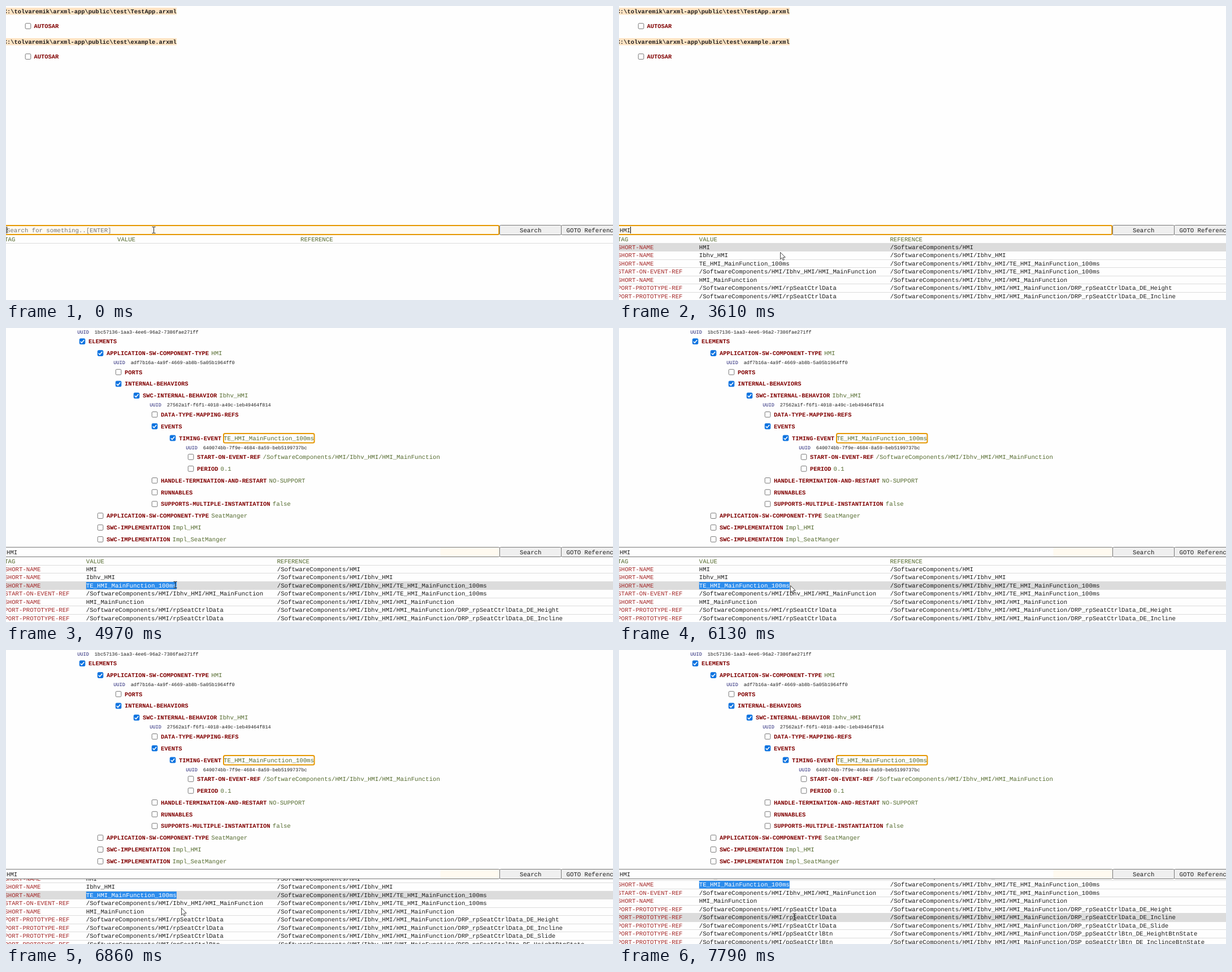
Write an HTML page that moves like this. It is 1074 px wide and 521 px high and loops after 8 s.

```html
<!DOCTYPE html>
<html lang="en">
<head>
<meta charset="utf-8">
<title>ARXML search</title>
<style>
  html, body { margin: 0; width: 100%; height: 100%; overflow: hidden; background: #fefefe; }
  svg { display: block; width: 100%; height: 100%; }
  text { font: 10.667px "Liberation Mono", "Courier New", monospace; fill: #1c1c1c; white-space: pre; text-rendering: geometricPrecision; }
  .bold { font-size: 10.42px; font-weight: 700; }
  .tag { fill: #800000; }
  .val, .head { fill: #556b2f; }
  .ref { fill: #a52a2a; }
  .small { font-size: 8.533px; }
  .uuid { fill: #191970; }
  .hint { fill: #757575; }
  .crisp { shape-rendering: crispEdges; }
</style>
</head>
<body>
<svg viewBox="0 0 1074 521" id="stage">
  <clipPath id="below"><rect y="406" width="1074" height="115"/></clipPath>
</svg>
<script>
const LOOP = 8000;
const stage = document.getElementById('stage');

function el(parent, name, attrs) {
  const node = document.createElementNS(stage.namespaceURI, name);
  for (const key in attrs) node.setAttribute(key, attrs[key]);
  return parent.appendChild(node);
}
const group = (parent = stage, attrs = {}) => el(parent, 'g', attrs);
const rect = (parent, x, y, width, height, attrs) => el(parent, 'rect', { x, y, width, height, ...attrs });
function text(parent, x, mid, str, cls = '') {
  const drop = cls.includes('small') ? 2.8 : 3.5;
  const node = el(parent, 'text', { x, y: mid + drop, class: cls });
  node.textContent = str;
  return node;
}
const show = (node, on) => node.setAttribute('display', on ? 'inline' : 'none');

// Last value whose start time has passed
function at(steps, t) {
  let value = steps[0][1];
  for (const [start, v] of steps) if (t >= start) value = v;
  return value;
}

function checkbox(parent, x, y, on) {
  rect(parent, x - 4.8, y - 4.8, 9.6, 9.6, {
    rx: 1.6, fill: on ? '#0b72e0' : '#fff', stroke: on ? '#0b72e0' : '#767676'
  });
  if (on) el(parent, 'path', {
    d: `M${x - 3.2} ${y + 0.2}l2.2 2.3l4.2 -5`, fill: 'none', stroke: '#fff', 'stroke-width': 1.6
  });
}

// Collapsed files
const files = group();
['TestApp', 'example'].forEach((name, i) => {
  const y = 9 + 54 * i;
  rect(files, -6, y - 6, 308, 12.5, { fill: '#ffe4c4' });
  text(files, -4.2, y, `C:\\tolvaremik\\arxml-app\\public\\test\\${name}.arxml`, 'bold');
  checkbox(files, 39, y + 26.6, false);
  text(files, 49.5, y + 26.6, 'AUTOSAR', 'bold tag');
});

// Expanded tree: level, label, value, checked
const nodes = [
  [-1, 'UUID', '1bc57136-1aa3-4ee6-96a2-7386fae271ff'],
  [0, 'ELEMENTS', '', 1],
  [1, 'APPLICATION-SW-COMPONENT-TYPE', 'HMI', 1],
  [1, 'UUID', 'adf7b16a-4a9f-4669-ab8b-5a05b1964ff0'],
  [2, 'PORTS', ''],
  [2, 'INTERNAL-BEHAVIORS', '', 1],
  [3, 'SWC-INTERNAL-BEHAVIOR', 'Ibhv_HMI', 1],
  [3, 'UUID', '27562a1f-f6f1-4018-a49c-1eb49464f814'],
  [4, 'DATA-TYPE-MAPPING-REFS', ''],
  [4, 'EVENTS', '', 1],
  [5, 'TIMING-EVENT', 'TE_HMI_MainFunction_100ms', 1],
  [5, 'UUID', '640074bb-7f9e-4684-8a59-beb5199737bc'],
  [6, 'START-ON-EVENT-REF', '/SoftwareComponents/HMI/Ibhv_HMI/HMI_MainFunction'],
  [6, 'PERIOD', '0.1'],
  [4, 'HANDLE-TERMINATION-AND-RESTART', 'NO-SUPPORT'],
  [4, 'RUNNABLES', ''],
  [4, 'SUPPORTS-MULTIPLE-INSTANTIATION', 'false'],
  [1, 'APPLICATION-SW-COMPONENT-TYPE', 'SeatManger'],
  [1, 'SWC-IMPLEMENTATION', 'Impl_HMI'],
  [1, 'SWC-IMPLEMENTATION', 'Impl_SeatManger']
];
const tree = group();
let y = 7;
nodes.forEach(([level, label, value, on], i) => {
  const x = 146 + 32 * level;
  const isId = label === 'UUID';
  if (i) y += isId || nodes[i - 1][1] === 'UUID' ? 16.75 : 20.85;
  if (isId) {
    text(tree, x + 12.3, y, label, 'small uuid');
    text(tree, x + 42.7, y, value, 'small');
  } else {
    checkbox(tree, x - 11, y, on);
    text(tree, x, y, label, 'bold tag');
    text(tree, x + label.length * 6.25 + 4, y, value, 'val');
  }
});
rect(tree, 385, 187, 160.5, 16.5, { rx: 2.5, fill: 'none', stroke: '#e59700', 'stroke-width': 2 });

// Result table
const PITCH = 14.45, TOP = 420.3;
const clip = group(stage, { 'clip-path': 'url(#below)' });
const table = group(clip);
const emptyHead = group(table), results = group(table);
function heading(parent, valueX, refX) {
  text(parent, -2.8, 413, 'TAG', 'head');
  text(parent, valueX, 413, 'VALUE', 'head');
  text(parent, refX, 413, 'REFERENCE', 'head');
}
const line = (parent, i) => rect(parent, 0, TOP + i * PITCH - 0.3, 1074, 1, { fill: '#dcdcdc', class: 'crisp' });
heading(emptyHead, 197, 521);
line(emptyHead, 0);
heading(results, 141.8, 479.4);

const base = '/SoftwareComponents/HMI';
const main = base + '/Ibhv_HMI/HMI_MainFunction';
const timing = base + '/Ibhv_HMI/TE_HMI_MainFunction_100ms';
const port = (name, kind, item) =>
  ['PORT-PROTOTYPE-REF', `${base}/${name}`, `${main}/${kind}_${name}_DE_${item}`];
const rows = [
  ['SHORT-NAME', 'HMI', base],
  ['SHORT-NAME', 'Ibhv_HMI', base + '/Ibhv_HMI'],
  ['SHORT-NAME', 'TE_HMI_MainFunction_100ms', timing],
  ['START-ON-EVENT-REF', main, timing],
  ['SHORT-NAME', 'HMI_MainFunction', main],
  port('rpSeatCtrlData', 'DRP', 'Height'),
  port('rpSeatCtrlData', 'DRP', 'Incline'),
  port('rpSeatCtrlData', 'DRP', 'Slide'),
  port('ppSeatCtrlBtn', 'DSP', 'HeightBtnState'),
  port('ppSeatCtrlBtn', 'DSP', 'InclinceBtnState')
];
const hoverBar = rect(results, 0, 0, 1074, PITCH, { fill: '#dcdcdc' });
const marked = rect(results, 141.8, TOP + 2 * PITCH + 0.2, 160, PITCH - 0.6, { fill: '#2c8cec' });
const values = rows.map(([tag, value, ref], i) => {
  const mid = TOP + PITCH * (i + 0.5);
  line(results, i);
  text(results, -2.6, mid, tag, 'ref');
  text(results, 479.8, mid, ref);
  return text(results, 141.8, mid, value);
});

// Search bar
const focused = group();
rect(focused, -10, 389, 882.3, 16, { rx: 2, fill: '#fffaf0', stroke: '#e59700', 'stroke-width': 2 });
const blurred = group();
rect(blurred, -10, 388.5, 883.5, 17, { rx: 2, fill: '#fffaf0', stroke: '#767676' });
const faded = rect(blurred, 0, 389, 768.5, 16, { fill: '#fefefe' });
for (const [x, w, labelX, label] of [[873.5, 109, 909, 'Search'], [982.5, 110, 991.6, 'GOTO Reference']]) {
  rect(stage, x, 388.5, w, 17, { rx: 2, fill: '#efefef', stroke: '#767676' });
  text(stage, labelX, 397, label);
}
const hint = text(stage, 1, 397, 'Search for something..[ENTER]', 'hint');
const query = text(stage, 1, 397, '');
const caret = rect(stage, 0, 391, 1, 12, { fill: '#000', class: 'crisp' });

// Pointer shapes, hot spot at 0,0
const beam = el(stage, 'path', {
  d: 'M-3 -5.5h2.5l.5 .5l.5 -.5h2.5M0 -5v10M-3 5.5h2.5l.5 -.5l.5 .5h2.5',
  fill: 'none', stroke: '#222'
});
const arrow = el(stage, 'path', {
  d: 'M.5 .5v12.2l2.8 -2.6l1.9 4.4l2.1 -.9l-1.9 -4.3h3.8z', fill: '#fff', stroke: '#333', 'stroke-width': 0.9
});

const typed = [[0, ''], [90, 'H'], [490, 'HM'], [1000, 'HMI']];
const caretOn = [[0, 1], [1600, 0], [2140, 1], [2630, 0], [3180, 1], [3720, 0], [4180, 1], [4700, 0]];
const hovered = [[0, -1], [3550, 0], [3670, 1], [3863, 2], [7250, 5], [7634, 6]];
const pointer = [[0, beam], [3430, arrow], [3863, beam], [6130, arrow], [7190, beam]];
const scrolled = [[0, 0], [6740, 4], [6800, 12], [6860, 22], [6920, 31.5], [6980, 38], [7040, 40.5]];
// Pointer moves: start, end, steps, goal x, goal y, ease power
const moves = [
  [3370, 3610, 4, 285, 436, 1],
  [3610, 4180, 9, 299, 455, 2],
  [6070, 6250, 3, 310, 457, 1],
  [7400, 7790, 5, 310, 473, 1]
];
function pointerAt(t) {
  let x = 261, y = 397;
  for (const [start, end, n, gx, gy, power] of moves) {
    if (t < start) break;
    const p = Math.min(1, Math.floor((t - start) / (end - start) * n + 1e-6) / n);
    const k = 1 - (1 - p) ** power;
    x += (gx - x) * k;
    y += (gy - y) * k;
  }
  return [x, y];
}

function draw(t) {
  const opened = t >= 4970, found = t >= 2350, blur = t >= 4700;
  show(files, !opened);
  show(tree, opened);
  show(emptyHead, !found);
  show(results, found);
  show(focused, !blur);
  show(blurred, blur);
  show(faded, opened);

  const str = at(typed, t);
  show(hint, !str);
  query.textContent = str;
  caret.setAttribute('x', Math.round(0.8 + str.length * 6.4));
  show(caret, at(caretOn, t));

  const row = at(hovered, t);
  show(hoverBar, row >= 0);
  hoverBar.setAttribute('y', TOP + row * PITCH);
  show(marked, opened);
  values[2].style.fill = opened ? '#fff' : '';
  table.setAttribute('transform', `translate(0 ${-at(scrolled, t)})`);

  const shape = at(pointer, t);
  const [x, y] = pointerAt(t);
  for (const p of [beam, arrow]) show(p, p === shape);
  const snap = shape === beam ? 0.5 : 0;
  shape.setAttribute('transform', `translate(${Math.round(x) + snap} ${Math.round(y)})`);
}

const begin = performance.now();
function tick() {
  draw((performance.now() - begin) % LOOP);
  requestAnimationFrame(tick);
}
tick();
</script>
</body>
</html>
```
